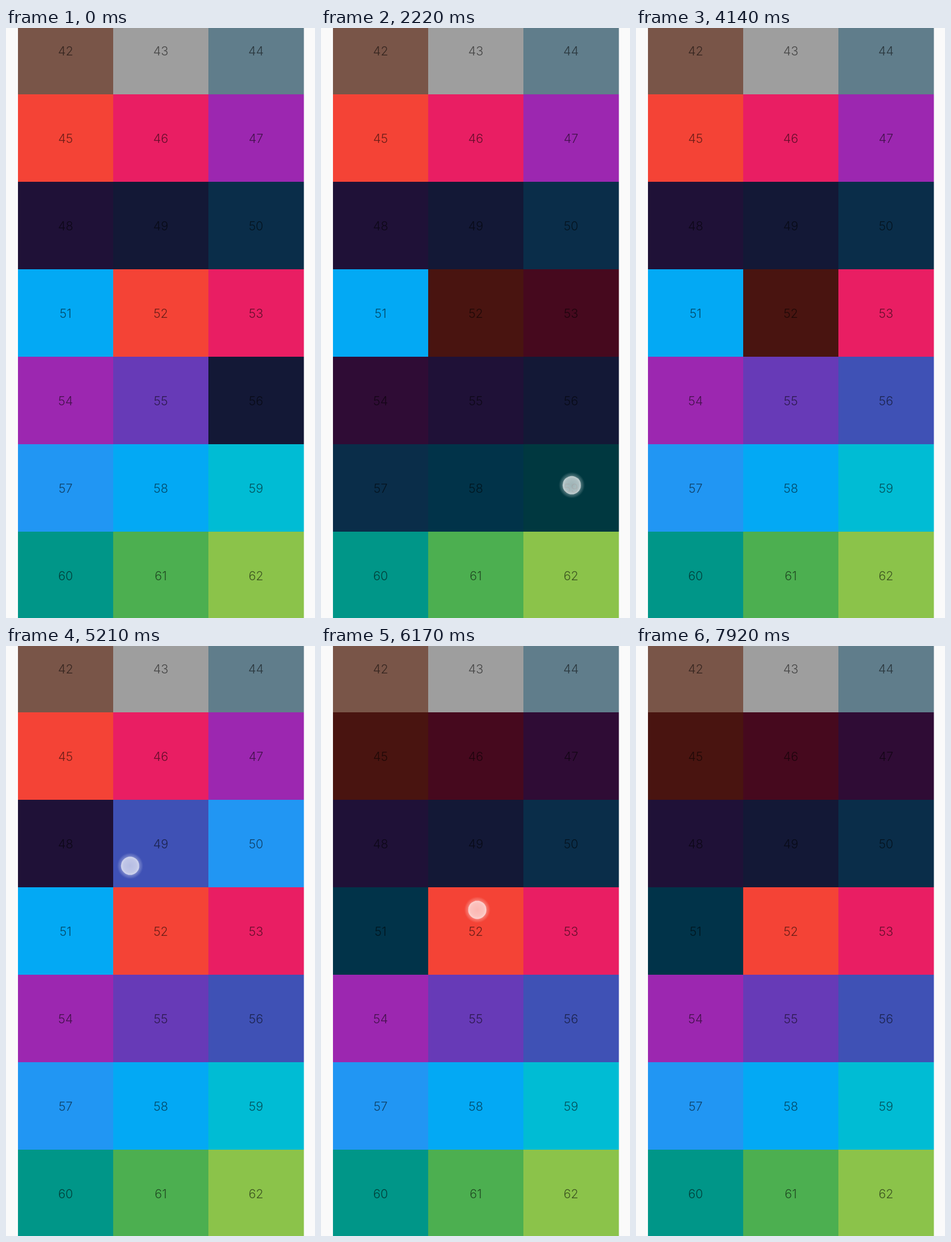
Animation, 542 px wide and 1032 px high, one loop 7970 ms. Source, as an HTML page:

```html
<!DOCTYPE html>
<html lang="en">
<head>
<meta charset="utf-8">
<title>Drag selection grid</title>
<style>
  html, body { margin: 0; width: 100%; height: 100%; overflow: hidden; background: #fafafa; }
  svg { display: block; }
  text { font: 300 21.5px Inter, Roboto, "Liberation Sans", sans-serif; text-anchor: middle; fill: #000; fill-opacity: .56; }
</style>
</head>
<body>
<svg id="stage" width="542" height="1032" viewBox="0 0 542 1032">
  <defs>
    <radialGradient id="disc">
      <stop offset="0" stop-color="#fff" stop-opacity=".62"/>
      <stop offset=".7" stop-color="#fff" stop-opacity=".67"/>
      <stop offset="1" stop-color="#fff" stop-opacity=".76"/>
    </radialGradient>
    <radialGradient id="halo">
      <stop offset=".68" stop-color="#fff" stop-opacity="0"/>
      <stop offset=".7" stop-color="#fff" stop-opacity=".3"/>
      <stop offset="1" stop-color="#fff" stop-opacity="0"/>
    </radialGradient>
  </defs>
  <g id="grid"></g>
  <g id="touch">
    <circle r="23" fill="url(#halo)"/>
    <circle r="16" fill="url(#disc)"/>
  </g>
</svg>
<script>
const LOOP = 7970, LAG = 50;
const FIRST = 42, COUNT = 21, COLS = 3;
const LEFT = 21, TOP = -37, W = 167, H = 153;
const COLORS = ['795548', '9e9e9e', '607d8b', 'f44336', 'e91e63', '9c27b0', '673ab7',
  '3f51b5', '2196f3', '03a9f4', 'f44336', 'e91e63', '9c27b0', '673ab7', '3f51b5',
  '2196f3', '03a9f4', '00bcd4', '009688', '4caf50', '8bc34a'];
const START = [48, 49, 50, 56];

// down/up: touch visible; grab: long press fires; path: [ms, x, y]
const DRAGS = [
  { down: 940, grab: 1400, end: 3300, up: 3450, origin: 52, value: true, path: [
    [940, 287, 512], [1550, 287, 512], [1650, 304, 534], [1760, 341, 584], [1950, 408, 690],
    [2180, 440, 798], [2350, 438, 802], [2600, 376, 706], [2830, 305, 597],
    [3000, 275, 538], [3200, 268, 522], [3500, 268, 522]] },
  { down: 4190, grab: 4540, end: 6450, up: 6770, origin: 52, value: false, path: [
    [4190, 285, 510], [4720, 285, 510], [5000, 258, 456], [5210, 218, 385], [5430, 152, 245],
    [5580, 125, 200], [5740, 138, 224], [6000, 222, 368], [6170, 274, 461],
    [6320, 288, 504], [6500, 288, 506]] }
];
const FADE_IN = 80, FADE_OUT = 200;

const clamp = v => Math.max(0, Math.min(1, v));

// Cubic Hermite through timed points, at rest at both ends
function pointAt(path, t) {
  const last = path.length - 1;
  if (t <= path[0][0]) return path[0].slice(1);
  if (t >= path[last][0]) return path[last].slice(1);
  let i = 0;
  while (path[i + 1][0] < t) i++;
  const slope = (k, c) => {
    if (k === 0 || k === last) return 0;
    const a = path[k - 1], b = path[k], d = path[k + 1];
    const s1 = (b[c] - a[c]) / (b[0] - a[0]), s2 = (d[c] - b[c]) / (d[0] - b[0]);
    return s1 * s2 <= 0 ? 0 : 2 * s1 * s2 / (s1 + s2);
  };
  const p = path[i], q = path[i + 1], span = q[0] - p[0], u = (t - p[0]) / span;
  return [1, 2].map(c =>
    (1 + 2 * u) * (1 - u) ** 2 * p[c] + u * (1 - u) ** 2 * span * slope(i, c) +
    u * u * (3 - 2 * u) * q[c] + u * u * (u - 1) * span * slope(i + 1, c));
}

function cellAt([x, y]) {
  return FIRST + Math.floor((y - TOP) / H) * COLS + Math.floor((x - LEFT) / W);
}

// Cells inside the dragged range take the value, cells left behind take its opposite
function selectionAt(t) {
  const on = new Set(START);
  const mark = (a, b, value) => {
    for (let n = Math.min(a, b); n <= Math.max(a, b); n++) value ? on.add(n) : on.delete(n);
  };
  for (const { grab, end, origin, value, path } of DRAGS) {
    if (t < grab) break;
    let prev = origin;
    mark(origin, origin, value);
    for (let s = grab; s <= Math.min(t, end); s += 10) {
      const cell = cellAt(pointAt(path, s - LAG));
      if (cell === prev) continue;
      mark(origin, prev, !value);
      mark(origin, cell, value);
      prev = cell;
    }
  }
  return on;
}

function add(parent, tag, attrs) {
  const el = document.createElementNS('http://www.w3.org/2000/svg', tag);
  for (const k in attrs) el.setAttribute(k, attrs[k]);
  return parent.appendChild(el);
}

const grid = document.getElementById('grid');
const touch = document.getElementById('touch');
const cells = COLORS.slice(0, COUNT).map((hex, i) => {
  const x = LEFT + (i % COLS) * W, y = TOP + Math.floor(i / COLS) * H;
  const rgb = [0, 2, 4].map(k => parseInt(hex.substr(k, 2), 16));
  const rect = add(grid, 'rect', { x, y, width: W + .5, height: H });
  add(grid, 'text', { x: x + W / 2, y: y + H / 2 + 8 }).textContent = FIRST + i;
  return { rect, light: `rgb(${rgb})`, dark: `rgb(${rgb.map(v => Math.round(v * .3))})` };
});

function draw(t) {
  const on = selectionAt(t);
  cells.forEach((c, i) => c.rect.setAttribute('fill', on.has(FIRST + i) ? c.dark : c.light));
  const drag = DRAGS.find(d => t >= d.down && t < d.up + FADE_OUT);
  touch.setAttribute('opacity', drag
    ? clamp((t - drag.down) / FADE_IN) * clamp(1 - (t - drag.up) / FADE_OUT) : 0);
  if (drag) touch.setAttribute('transform', `translate(${pointAt(drag.path, t)})`);
}

const began = performance.now();
function tick() {
  draw((performance.now() - began) % LOOP);
  requestAnimationFrame(tick);
}
tick();
</script>
</body>
</html>
```
